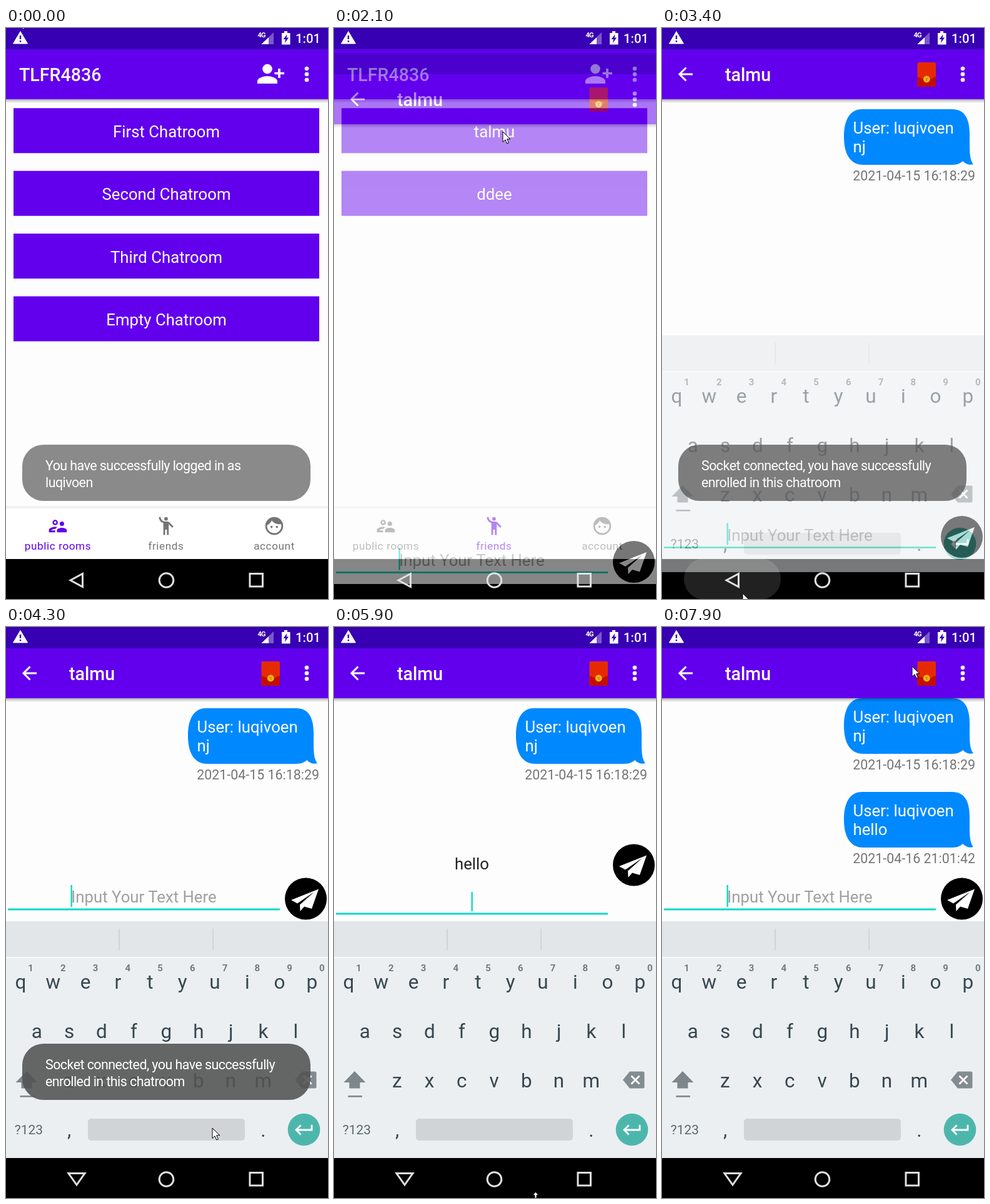
Recreate the animation shown at these times as an HTML page. Size 515x914 px, loop 8000 ms.

```html
<!DOCTYPE html>
<html lang="en">
<head>
<meta charset="utf-8">
<title>Chat app</title>
<style>
  html, body { margin: 0; width: 100%; height: 100%; overflow: hidden; background: #000; }
  svg { display: block; width: 515px; height: 914px; font-family: Roboto, sans-serif; }
  text { white-space: pre; }
</style>
</head>
<body>
<svg id="stage" viewBox="0 0 515 914"></svg>
<script>
const PURPLE = '#6200ee', DARK = '#3700b3', GREY = '#757575', TEAL = '#11d8c8';
const ROOMS = ['First Chatroom', 'Second Chatroom', 'Third Chatroom', 'Empty Chatroom'];
const FRIENDS = ['talmu', 'ddee'];
const USER = 'luqivoen';

const rect = (x, y, w, h, fill, more = '') =>
  `<rect x="${x}" y="${y}" width="${w}" height="${h}" fill="${fill}" ${more}/>`;
const circle = (x, y, r, fill, more = '') =>
  `<circle cx="${x}" cy="${y}" r="${r}" fill="${fill}" ${more}/>`;
const path = (d, fill, more = '') => `<path d="${d}" fill="${fill}" ${more}/>`;
const line = (d, stroke, width, more = '') =>
  path(d, 'none', `stroke="${stroke}" stroke-width="${width}" ${more}`);
const text = (x, y, size, str, fill = '#fff', more = '') =>
  `<text x="${x}" y="${y}" font-size="${size}" fill="${fill}" ${more}>${str}</text>`;
const group = (id, body, more = '') => `<g id="${id}" ${more}>${body}</g>`;
const MID = 'text-anchor="middle"';

// Status strip, app bar and its shadow
const appBar = (x, title, icons) =>
  rect(0, 114, 515, 6, 'url(#shadow)') + rect(0, 0, 515, 34, DARK) + rect(0, 34, 515, 80, PURPLE) +
  text(x, 84.5, 28.6, title, '#fff', 'font-weight="500"') + icons +
  [65, 74, 83].map(y => circle(481, y, 3.3, '#fff')).join('');

const buttons = names => names.map((name, i) => {
  const y = 128.3 + i * 100.4;
  return rect(12, y, 489, 72, PURPLE) + text(256.5, y + 46.5, 25.75, name, '#fff', MID);
}).join('');

const tab = (i, x, label, icon) => group('tab' + i,
  `<g transform="translate(${x - 17.2} 780) scale(1.43)" fill-rule="evenodd">${icon}</g>` +
  `<text x="${x}" y="835" font-size="17.2" letter-spacing=".57" ${MID}>${label}</text>`);

const shape = d => `<path d="${d}"/>`;
const peopleIcon = shape('M16.5 12a2.5 2.5 0 1 0 0-5a2.5 2.5 0 0 0 0 5zM9 11a3 3 0 1 0 0-6a3 3 0 0 0 0 6zM9 9.3a1.3 1.3 0 1 1 0-2.6a1.3 1.3 0 0 1 0 2.6z' +
  'M16.5 14c-1.83 0-5.5.92-5.5 2.75V19h11v-2.25c0-1.83-3.67-2.75-5.5-2.75zM9 13c-2.33 0-7 1.17-7 3.5V19h7v-2h-4.7c.8-.9 2.7-1.8 5.3-2c.4-.7 1-1.2 1.8-1.7C10.5 13.1 9.66 13 9 13z');
const waveIcon = '<circle cx="12" cy="4" r="2"/>' +
  shape('M15.89 8.11C15.5 7.72 14.83 7 13.53 7H11C8.24 7 6 4.75 6 2H4c0 3.16 2.11 5.84 5 6.71V22h2v-6h2v6h2V10.05L18.95 14l1.41-1.41z');
const faceIcon = '<circle cx="9" cy="13" r="1.25"/><circle cx="15" cy="13" r="1.25"/>' +
  shape('M12 2a10 10 0 1 0 0 20a10 10 0 0 0 0-20zM12 20a8 8 0 0 1-7.95-8.86c2.36-1.05 4.23-2.98 5.21-5.37C11.07 8.33 14.05 10 17.42 10c.78 0 1.53-.09 2.25-.26A8 8 0 0 1 12 20z');

const home =
  rect(0, 0, 515, 850, '#fdfdfd') +
  group('rooms', buttons(ROOMS)) + group('friends', buttons(FRIENDS)) +
  appBar(21, 'TLFR4836',
    circle(418, 65.5, 7.8, '#fff') + path('M402 89v-4c0-5 10-8 16-8s16 3 16 8v4z', '#fff') +
    line('M437 65v15M429.500 72.500h15.500', '#fff', 3.7)) +
  rect(0, 765.5, 515, 3.5, '#f1f1f1') + rect(0, 769, 515, 81, '#fff') +
  `<g clip-path="url(#tabClip)">${circle(256.5, 809, 95, '#000', 'id="tabRipple"')}</g>` +
  tab(0, 83, 'public rooms', peopleIcon) + tab(1, 256, 'friends', waveIcon) + tab(2, 429, 'account', faceIcon);

const bubble = (id, y, msg, time) => group(id,
  path('M320 130H464C484 130 492 145 492 170V190C492 205 494 214 498 218C492 220 486 218 481 213C476 218 470 219 462 219H322C300 219 291 200 291 174S300 130 320 130Z', '#0089ff') +
  text(305.5, 169, 25.75, 'User: ' + USER) + text(305.5, 199, 25.75, msg) +
  text(501, 244, 21.4, time, GREY, 'text-anchor="end"'), `transform="translate(0 ${y})"`);

const envelope = rect(408.5, 55, 29.5, 39, '#e62a00', 'rx="2"') +
  path('M408.500 78L423 84L438 78V92q0 2-2 2H410.500q-2 0-2-2z', '#c20d00') +
  circle(423.3, 82, 5.4, '#f7b512') + line('M421.500 80l1.800 2.200l1.800-2.200M423.300 82v3', '#b86a00', 1);

const chat =
  rect(0, 0, 515, 850, '#fdfdfd') + rect(0, 850, 515, 64, '#000') +
  `<g clip-path="url(#listClip)">${group('list',
    bubble('msg1', 0, 'nj', '2021-04-15 16:18:29') + bubble('msg2', 150, 'hello', '2021-04-16 21:01:42'))}</g>` +
  appBar(101, 'talmu', line('M49 74H29M38.500 63.500L28 74L38.500 84.500', '#fff', 3) + envelope) +
  group('input',
    text(220.5, 441, 25.75, 'Input Your Text Here', '#a0a0a0', MID + ' id="hint"') +
    text(220.5, 441, 25.75, '', '#212121', MID + ' id="typed"') +
    rect(0, 0, 2.4, 35, TEAL, 'id="caret"') +
    rect(3, 450.5, 435, 3, TEAL, 'id="under"') +
    group('send', circle(479.5, 435, 33.5, '#000') +
      path('M500 419.500L456 437L466 442.500L493 424L470 444.500L470.500 455L477 447.500L489 451Z', '#fff')));

const letters = (row, x, y) => [...row].map((c, i) =>
  text(x + i * 51.75, y, 31.5, c, '#37474f', MID)).join('');

const keyboard =
  rect(0, 471, 515, 379, '#ebeff1') + rect(0, 471, 515, 57, '#e2e6e8') + rect(0, 528, 515, 2, '#f8f9fa') +
  rect(180.5, 483, 1.3, 34, '#c6cbce') + rect(330.5, 483, 1.3, 34, '#c6cbce') +
  letters('qwertyuiop', 23.5, 578.5) + letters('asdfghjkl', 49.3, 657.5) + letters('zxcvbnm', 100.8, 737) +
  [...'1234567890'].map((c, i) =>
    text(39.5 + i * 51.75, 551, 15, c, '#737c80', MID + ' font-weight="700"')).join('') +
  path('M33 711L50.500 729H41.500V738.500H24.500V729H15.500Z', '#7d878b') + rect(22.5, 750, 22.5, 2.6, '#7d878b') +
  path('M462 725L473 711.500H494q2.500 0 2.500 2.500V736q0 2.500-2.500 2.500H473Z', '#838c90') +
  line('M475.500 718.500l13 13m0-13l-13 13', '#fff', 2.8) +
  text(36.5, 812, 21, '?123', '#5c686d', MID) + letters(',', 101, 815) + letters('.', 411.5, 815.5) +
  rect(131, 787, 251, 35, '#d0d4d6', 'rx="5"') +
  circle(476.5, 804.5, 25.8, '#4db6ac') +
  line('M489 797v8H465M471.500 797.500l-7.500 7.500l7.500 7.500', '#fff', 2.8);

const toast = (id, a, b) => group(id,
  rect(26, 667, 461, 90, '#535353', 'rx="34" opacity=".88"') +
  [a, b].map((s, i) => text(63, 708 + i * 27, 21.5, s, '#fff', 'letter-spacing="-.58"')).join(''));

const statusIcons =
  path('M23 5.500L34.500 25H11.500Z', '#fff', 'stroke="#fff" stroke-linejoin="round"') +
  rect(21.8, 12, 2.4, 6, DARK) + rect(21.8, 20, 2.4, 2.5, DARK) +
  text(402.5, 15, 11, '4G', '#fff', 'font-weight="700" letter-spacing="-.8"') +
  path('M428 7V26H408.500Z', '#fff', 'opacity=".35"') + path('M420 15V26H408.500Z', '#fff') +
  path('M441 8h4V5h5v3h4.500V26.500H441Z', '#fff') + path('M449.500 10L443.500 18H447L446 24L452 15.500H448.500Z', DARK) +
  text(503, 23.5, 20.3, '1:01', '#fff', 'font-weight="500" text-anchor="end"');

const navIcons =
  rect(35, 849, 155, 66, '#fff', 'id="navRipple" rx="33" opacity=".13"') +
  `<g fill="none" stroke="#e0e0e0" stroke-width="3">
    <path id="back" d="M103 884L122.500 873.500V894.500Z"/><path id="down" d="M100 874.500H126L113 893Z"/>
    <circle cx="256.500" cy="884" r="11.300"/><rect x="390" y="873.500" width="20.500" height="20.500"/></g>`;

const pointers =
  path('M0 0V16.500L4 12.800L6.800 19L9.500 18L6.700 11.800H12Z', '#fff', 'id="arrow" stroke="#000" stroke-width="1"') +
  path('M322.500 904.500L327 909.500H324V914H321V909.500H318Z', '#fff', 'id="resize" stroke="#000" stroke-width=".8"');

document.getElementById('stage').innerHTML =
  `<defs>
    <linearGradient id="shadow" x2="0" y2="1"><stop stop-color="#000" stop-opacity=".3"/><stop offset="1" stop-opacity="0"/></linearGradient>
    <clipPath id="tabClip"><rect y="769" width="515" height="81"/></clipPath>
    <clipPath id="listClip"><rect y="114" width="515" height="286"/></clipPath>
  </defs>` +
  rect(0, 850, 515, 64, '#000') + group('home', home) + group('chat', chat) + group('keys', keyboard) +
  toast('toast1', 'You have successfully logged in as', USER) +
  toast('toast2', 'Socket connected, you have successfully', 'enrolled in this chatroom') +
  statusIcons + navIcons + pointers;

const el = {};
document.querySelectorAll('[id]').forEach(e => el[e.id] = e);

// Keyframes: [time, value, ...]
const MOUSE = [[100, 20, -17], [800, 249, 833], [1100, 249, 833], [1800, 270, 166], [2200, 270, 166],
  [2500, 269, 183], [2600, 269, 183], [3200, 129, 905], [3500, 129, 905], [4000, 330, 802], [4800, 330, 802],
  [5400, 322, 905], [6800, 322, 905], [6900, 444, 832], [7000, 444, 832], [7400, 480, 436], [7500, 480, 436], [7900, 400, 63]];
const CHAT = [[1900, 0, 73], [2000, .42, 48], [2100, .53, 40], [2200, .97, 11], [2300, 1, 0]];
const KEYS = [[2200, 0], [2500, 1], [3300, 1], [3400, .5], [3500, 0], [4000, 0], [4200, 1]];
const TOAST1 = [[0, .76], [300, 0]];
const TOAST2 = [[3300, 0], [3400, .84], [3500, 1], [5200, 1], [5500, 0]];
const TAB_RIPPLE = [[800, 0, 30], [900, .035, 65], [1000, .048, 95], [1100, .045, 95], [1400, 0, 95]];
const NAV_RIPPLE = [[3200, 0], [3300, .13], [3400, .13], [3600, 0]];
// Edits: [time, text, line breaks]
const EDITS = [[2000, '', 0], [4100, '', 0], [4900, 'h', 0], [5000, 'he', 0], [5200, 'hel', 0], [5300, 'hell', 0],
  [5400, 'hello', 0], [5600, 'hello', 1], [5900, 'hello', 2], [6300, 'hello', 1], [6600, 'hello', 0], [7500, '', 0]];

function at(frames, t) {
  const i = frames.findIndex(f => f[0] > t);
  if (i === 0) return frames[0].slice(1);
  if (i < 0) return frames[frames.length - 1].slice(1);
  const a = frames[i - 1], b = frames[i], p = (t - a[0]) / (b[0] - a[0]);
  return a.slice(1).map((v, j) => v + (b[j + 1] - v) * p);
}
const show = (e, on) => e.setAttribute('visibility', on ? 'inherit' : 'hidden');
const alpha = (e, a) => { e.setAttribute('opacity', a); show(e, a > 0); };
const move = (e, x, y) => e.setAttribute('transform', `translate(${x} ${y})`);

function drawInput(t, open) {
  const [since, str, breaks] = EDITS.filter(e => e[0] <= t).pop() || EDITS[0];
  move(el.input, 0, open ? 0 : 379.5);
  show(el.hint, !str);
  el.typed.textContent = str;
  el.typed.setAttribute('y', breaks ? 448.5 - 30.5 * breaks : 441);
  el.under.setAttribute('y', breaks ? 457.5 : 450.5);
  move(el.send, 0, breaks ? 7 - 30.5 * breaks : 0);
  const x = breaks ? 220.5 : str ? 221 + el.typed.getComputedTextLength() / 2 : 104.5;
  el.caret.setAttribute('x', x - 1);
  el.caret.setAttribute('y', breaks ? 424 : 413);
  el.caret.setAttribute('height', breaks ? 31 : 35);
  show(el.caret, (t - since) % 1000 < 500);
}

function draw(t) {
  show(el.rooms, t < 1000);
  show(el.friends, t >= 1200);
  [0, 1, 2].forEach(i => el['tab' + i].setAttribute('fill', i === (t < 1000 ? 0 : 1) ? PURPLE : GREY));
  const [rippleAlpha, r] = at(TAB_RIPPLE, t);
  alpha(el.tabRipple, rippleAlpha);
  el.tabRipple.setAttribute('r', r);

  const [chatAlpha, chatY] = at(CHAT, t);
  alpha(el.chat, chatAlpha);
  move(el.chat, 0, chatY);
  show(el.msg1, t >= 2400);
  show(el.msg2, t >= 7500);
  move(el.list, 0, t >= 7500 ? -16 : 0);

  const open = (t >= 2400 && t < 3400) || t >= 4100;
  drawInput(t, open);
  const [k] = at(KEYS, t);
  alpha(el.keys, k);
  move(el.keys, 0, 42 * (1 - k));
  show(el.back, !open);
  show(el.down, open);
  alpha(el.navRipple, at(NAV_RIPPLE, t)[0]);

  alpha(el.toast1, at(TOAST1, t)[0]);
  alpha(el.toast2, at(TOAST2, t)[0]);

  const edge = t >= 5400 && t < 6900;
  move(el.arrow, ...at(MOUSE, t));
  show(el.arrow, !edge);
  show(el.resize, edge);
}

const start = performance.now();
function tick() {
  const t = (performance.now() - start) % 8000;
  draw(Math.floor(t / 100) * 100);
  requestAnimationFrame(tick);
}
tick();
</script>
</body>
</html>
```
